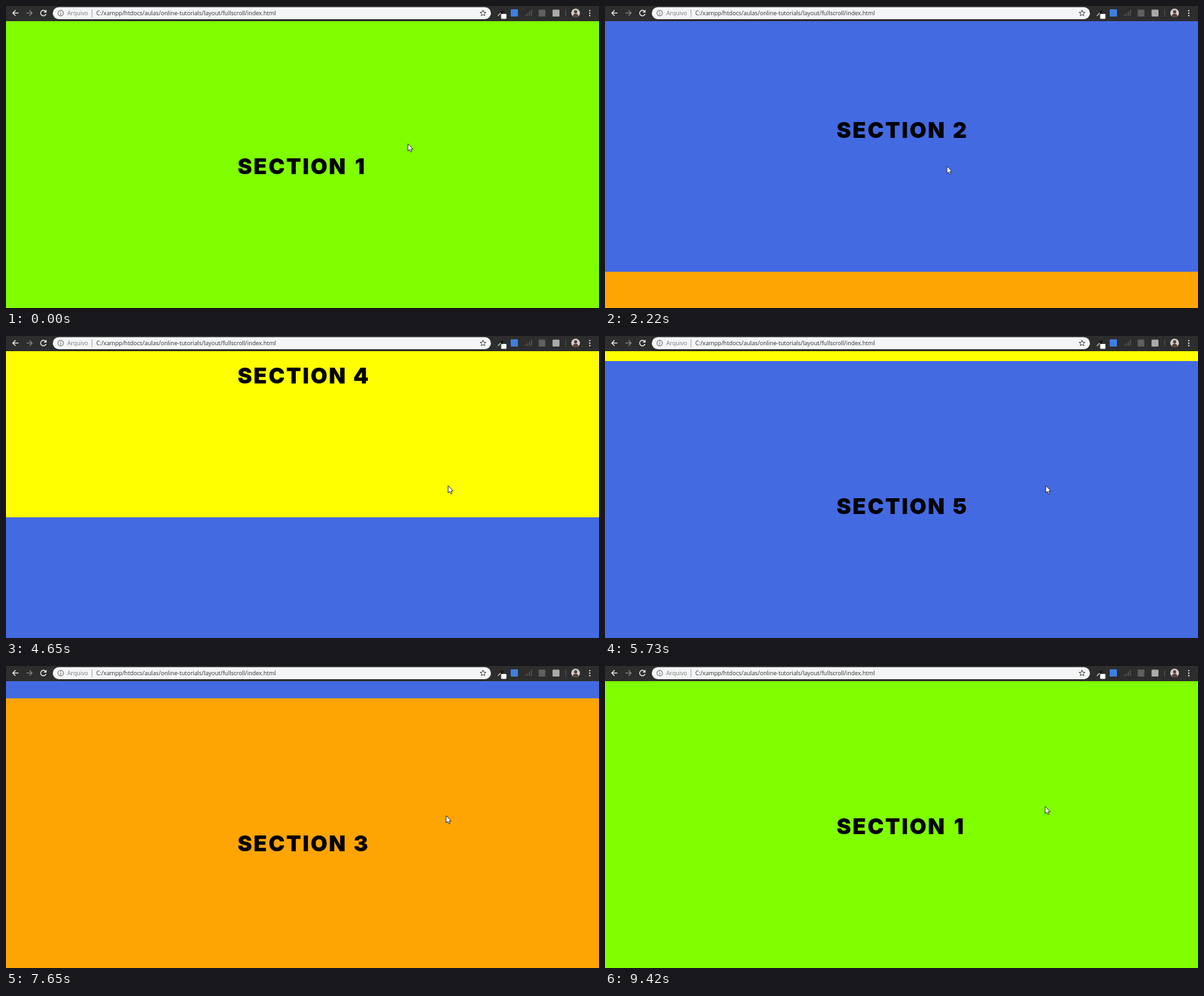
An HTML page for the animation above (9.45 s loop, 900x458 px).

```html
<!DOCTYPE html>
<html lang="en">
<head>
<meta charset="utf-8">
<title>Full-page scroll</title>
<style>
  html, body { margin: 0; width: 100%; height: 100%; overflow: hidden; background: #2d2d2d; }
  svg { display: block; width: 100vw; height: 100vh; }
  .title { font: 900 33px Inter, sans-serif; text-anchor: middle; fill: #000; }
  .word { letter-spacing: 2.3px; }
  .url { font: 8.75px "Open Sans", "Noto Sans", sans-serif; }
  .line { fill: none; stroke-width: 1.3; }
</style>
</head>
<body>
<svg viewBox="0 0 900 458">
  <g id="page"></g>

  <g id="toolbar">
    <rect width="900" height="23" fill="#2d2d2d"/>
    <path class="line" stroke="#f4f4f4" d="M19 10.7H10.5M14.5 6.5L10.3 10.7L14.5 14.9"/>
    <path class="line" stroke="#858585" d="M31 10.7H39.5M35.5 6.5L39.7 10.7L35.5 14.9"/>
    <path class="line" stroke="#f4f4f4" d="M60 8A4.2 4.2 0 1 0 60.8 12"/>
    <path fill="#f4f4f4" d="M61.5 5.6V10H57.1Z"/>

    <rect x="71" y="1.8" width="665" height="18.2" rx="9.1" fill="#f4f5f7"/>
    <circle class="line" cx="83" cy="10.8" r="4.1" stroke="#5c5c5c" style="stroke-width:1"/>
    <path class="line" stroke="#5c5c5c" d="M83 10.2V13.2M83 8.2V9.3" style="stroke-width:1"/>
    <text class="url" x="93" y="14" fill="#7b7b7b">Arquivo</text>
    <path stroke="#a5a5a5" d="M130.5 5V17"/>
    <text class="url" x="137" y="14" fill="#333">C:/xampp/htdocs/aulas/online-tutorials/layout/fullscroll/index.html</text>
    <path id="star" class="line" stroke="#4c4c4c" style="stroke-width:1"/>

    <path d="M746.5 15L751.5 10" stroke="#bdbdbd" stroke-width="1.4"/>
    <path d="M750.5 8.5L753.5 11.5M751.8 10L754.6 7.2" stroke="#111" stroke-width="2.4"/>
    <rect x="751.5" y="12" width="8" height="7.5" rx="1.2" fill="#fff"/>
    <rect x="766" y="5" width="11" height="11" rx="1" fill="#3f7fe0"/>
    <path d="M788.5 15V13M791.5 15V11M794.5 15V8.5M797.5 15V6" stroke="#565656" stroke-width="1.5"/>
    <rect x="808.5" y="5.5" width="10" height="10.5" fill="#606060"/>
    <rect x="829.5" y="5.5" width="10.5" height="10.5" rx="1" fill="#aaa"/>
    <path stroke="#555" d="M849.5 6V16"/>
    <clipPath id="round"><circle cx="864.5" cy="10.7" r="6.6"/></clipPath>
    <g clip-path="url(#round)">
      <rect x="857" y="3" width="15" height="16" fill="#d3cfcd"/>
      <circle cx="864.5" cy="8.7" r="2.5" fill="#5b403a"/>
      <ellipse cx="864.5" cy="16" rx="4.3" ry="4.6" fill="#5b403a"/>
    </g>
    <g fill="#f0f0f0">
      <circle cx="886" cy="7" r="1.1"/><circle cx="886" cy="10.8" r="1.1"/><circle cx="886" cy="14.6" r="1.1"/>
    </g>
  </g>

  <path id="cursor" d="M0 0V11L2.5 8.7L4.2 12.4L6 11.6L4.4 8H7.7Z" fill="#fff" stroke="#1c1c1c" stroke-width=".9" stroke-linejoin="round"/>
</svg>
<script>
const LOOP = 9450, STEP = 30, TOP = 23, HEIGHT = 435, SCROLL_MS = 880;
const colors = ['#80ff00', '#446ae2', '#ffa503', '#ffff00', '#446ae2'];

// Scroll moves: start time and direction
const moves = [
  [985, 1], [2115, 1], [3175, 1], [4425, 1],
  [5684, -1], [6662, -1], [7584, -1], [8525, -1]
];

// Pointer positions: time, x, y
const pointer = [
  [0, 610, 209], [950, 536, 239], [1890, 520, 244], [2220, 519, 243],
  [2500, 519, 243], [3200, 671, 227], [4440, 671, 227], [5310, 669, 227],
  [6870, 669, 227], [8250, 668, 227], [8600, 668, 227], [9420, 668, 213]
];

const page = document.getElementById('page');
const cursor = document.getElementById('cursor');

page.innerHTML = colors.map((color, i) => `
  <g transform="translate(0 ${TOP + i * HEIGHT})">
    <rect width="900" height="${HEIGHT + 1}" fill="${color}"/>
    <text class="title word" x="434.7" y="231.5">SECTION</text>
    <text class="title" x="${i ? 538.5 : 537}" y="231.5">${i + 1}</text>
  </g>`).join('');

const starPoints = Array.from({ length: 10 }, (_, i) => {
  const angle = i * Math.PI / 5, radius = i % 2 ? 2 : 4.8;
  return `${724 + radius * Math.sin(angle)} ${11 - radius * Math.cos(angle)}`;
});
document.getElementById('star').setAttribute('d', `M${starPoints.join('L')}Z`);

// cubic-bezier(.25, .1, .25, 1)
function ease(x) {
  if (x <= 0) return 0;
  if (x >= 1) return 1;
  let low = 0, high = 1;
  for (let i = 0; i < 24; i++) {
    const mid = (low + high) / 2;
    if (.75 * mid * (1 - mid) + mid ** 3 < x) low = mid; else high = mid;
  }
  const u = low, v = 1 - u;
  return .3 * v * v * u + 3 * v * u * u + u ** 3;
}

function pointerAt(t) {
  const next = pointer.findIndex(p => p[0] > t);
  if (next < 0) return pointer[pointer.length - 1].slice(1);
  const [t0, x0, y0] = pointer[next - 1], [t1, x1, y1] = pointer[next];
  const k = (t - t0) / (t1 - t0), s = k * k * (3 - 2 * k);
  return [x0 + (x1 - x0) * s, y0 + (y1 - y0) * s];
}

function draw(t) {
  const position = moves.reduce((sum, [start, dir]) => sum + dir * ease((t - start) / SCROLL_MS), 0);
  page.setAttribute('transform', `translate(0 ${-Math.round(position * HEIGHT)})`);
  const [x, y] = pointerAt(t).map(Math.round);
  cursor.setAttribute('transform', `translate(${x} ${y})`);
}

const begin = performance.now();
function tick() {
  const t = (performance.now() - begin) % LOOP;
  draw(Math.floor(t / STEP) * STEP);
  requestAnimationFrame(tick);
}
tick();
</script>
</body>
</html>
```
